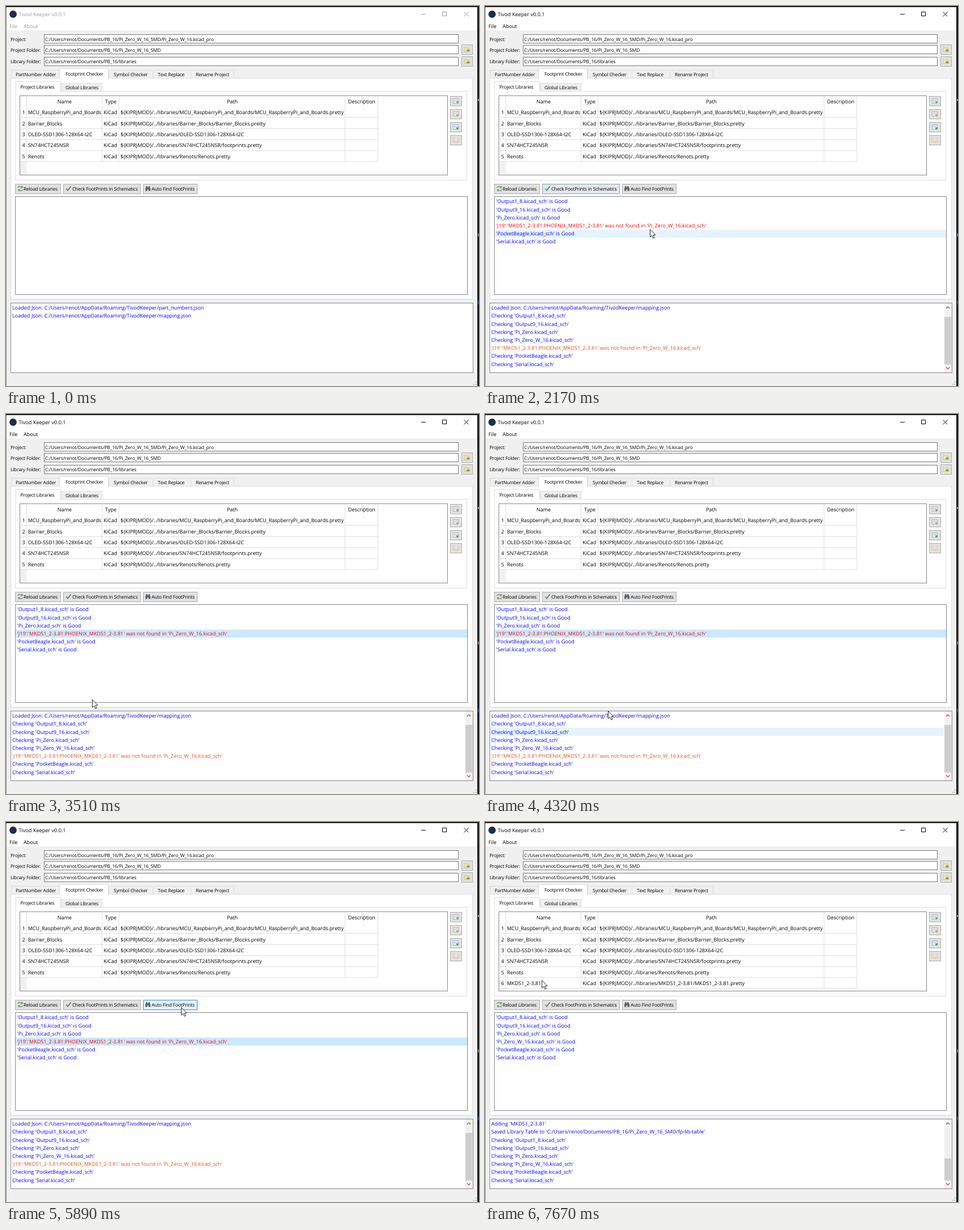
Write an HTML page that moves like this. It is 835x671 px and loops after 8000 ms.

```html
<!DOCTYPE html>
<html lang="en">
<head>
<meta charset="utf-8">
<title>Tivod Keeper</title>
<style>
html, body { margin: 0; width: 100%; height: 100%; overflow: hidden; background: #f0f0f0; }
svg { display: block; width: 835px; height: 671px; }
text {
  font: 9.05px "Open Sans", "Noto Sans", sans-serif;
  font-kerning: none;
  word-spacing: .25px;
  text-rendering: geometricPrecision;
}
.ui { font-size: 8.4px; letter-spacing: -.22px; }
.path { font-size: 8.4px; letter-spacing: -.14px; }
.mid-x { text-anchor: middle; }
.blue { fill: #00f; }
.red { fill: #f00; }
.orange { fill: #e1521f; }

.anim { animation: 8s step-end -10ms infinite; }
.before { animation-name: before; }
.after { animation-name: after; }
.checked { animation-name: checked; }
.fixed { animation-name: fixed; }
.active { animation-name: active; }
.check { animation-name: check; }
.find { animation-name: find; }
.selected { animation-name: selected; }
.list-hover { animation-name: list-hover; }
.log-hover { animation-name: log-hover; }
.cursor { animation-name: cursor; }

@keyframes before { 0% { opacity: 1 } 17%, 100% { opacity: 0 } }
@keyframes after { 0% { opacity: 0 } 17%, 100% { opacity: 1 } }
@keyframes checked { 0% { opacity: 0 } 17% { opacity: 1 } 76.25%, 100% { opacity: 0 } }
@keyframes fixed { 0% { opacity: 0 } 76.25%, 100% { opacity: 1 } }
@keyframes active { 0% { color: #999 } 15.25%, 100% { color: #000 } }

@keyframes check {
  0% { fill: #e1e1e1; stroke: #adadad }
  11.125% { fill: #e5f1fb; stroke: #2c8fdd }
  15.25% { fill: #cce4f7; stroke: #005499 }
  17% { fill: #e5f1fb; stroke: #2c8fdd }
  24.5% { fill: #e5f1fb; stroke: #2c8fdd; animation-timing-function: linear }
  29%, 100% { fill: #e1e1e1; stroke: #adadad }
}
@keyframes find {
  0% { fill: #e1e1e1; stroke: #adadad }
  71.125% { fill: #e5f1fb; stroke: #2c8fdd }
  75.375% { fill: #cce4f7; stroke: #005499 }
  76.25% { fill: #e5f1fb; stroke: #2c8fdd }
  85.5% { fill: #e5f1fb; stroke: #2c8fdd; animation-timing-function: linear }
  90%, 100% { fill: #e1e1e1; stroke: #adadad }
}
@keyframes selected {
  0% { fill: #fff }
  33% { fill: #cce8ff }
  75.375% { fill: #d9d9d9 }
  76.25%, 100% { fill: #fff }
}
@keyframes list-hover {
  0% { opacity: 0 }
  24.5% { opacity: 1; transform: translateY(0) }
  25.375% { transform: translateY(14.2px) }
  26.25% { transform: translateY(28.4px) }
  27.125% { transform: translateY(56.8px) }
  28% { opacity: 1; transform: translateY(42.6px) }
  33%, 100% { opacity: 0 }
}
@keyframes log-hover {
  0% { opacity: 0 }
  44.75% { opacity: 1; transform: translateY(42.6px) }
  45.625% { transform: translateY(71px) }
  47.375% { transform: translateY(56.8px) }
  54% { opacity: 1; transform: translateY(28.4px) }
  54.875%, 100% { opacity: 0 }
}
@keyframes cursor {
  0% { transform: translate(-40px, 0) }
  4.25% { transform: translate(463px, 618px) }
  5.125% { transform: translate(350px, 548px) }
  6% { transform: translate(236px, 478px) }
  8.5% { transform: translate(236px, 478px); animation-timing-function: steps(4, start) }
  12% { transform: translate(140px, 323px) }
  24.5% { transform: translate(140px, 323px); animation-timing-function: steps(4, start) }
  28% { transform: translate(291px, 394px); animation-timing-function: steps(3, start) }
  31% { transform: translate(313px, 388px) }
  36.375% { transform: translate(313px, 388px); animation-timing-function: steps(4, start) }
  39.875% { transform: translate(124px, 388px) }
  43.875% { transform: translate(152px, 504px) }
  44.75% { transform: translate(185px, 580px) }
  45.625% { transform: translate(205px, 603px) }
  46.5% { transform: translate(207px, 597px) }
  47.375% { transform: translate(207px, 591px) }
  54% { transform: translate(217px, 524px); animation-timing-function: steps(4, end) }
  57.5% { transform: translate(378px, 303px) }
  59.25% { transform: translate(378px, 303px); animation-timing-function: steps(5, start) }
  63.25% { transform: translate(346px, 261px) }
  65.875% { transform: translate(346px, 261px); animation-timing-function: steps(7, start) }
  72% { transform: translate(309px, 327px) }
  85.5% { transform: translate(309px, 327px); animation-timing-function: steps(5, start) }
  89.875% { transform: translate(564px, 270px); animation-timing-function: steps(6, start) }
  95.125%, 100% { transform: translate(100px, 279px) }
}
</style>
</head>
<body>
<svg id="stage" viewBox="0 0 835 671"></svg>
<script>
const ROW = 14.2;
const USER = 'C:/Users/renot';
const DATA = USER + '/AppData/Roaming/TivodKeeper';
const PROJECT = USER + '/Documents/PB_16';

const text = (x, y, s, cls = '') => `<text x="${x}" y="${y}" class="${cls}">${s}</text>`;
const fill = (x, y, w, h, color, cls = '') =>
  `<rect x="${x}" y="${y}" width="${w}" height="${h}" fill="${color}" class="${cls}"/>`;
const box = (x, y, w, h, color, line, cls = '') =>
  `<rect x="${x + .5}" y="${y + .5}" width="${w - 1}" height="${h - 1}" fill="${color}" stroke="${line}" class="${cls}"/>`;
const line = (d, color, width = 1) =>
  `<path d="${d}" fill="none" stroke="${color}" stroke-width="${width}"/>`;
const group = (cls, s) => `<g class="anim ${cls}">${s}</g>`;
const button = (x, y, w, h, cls = '') => box(x, y, w, h, '#e1e1e1', '#adadad', cls);

function frame() {
  const ink = 'currentColor';
  return fill(0, 0, 835, 671, '#f0f0f0') + fill(0, 2, 833, 41, '#fff') +
    fill(0, 0, 835, 2, '#1b1b1d') + fill(0, 2, 1, 669, '#8a8a8a') +
    fill(832, 2, 3, 669, '#1b1b1d') + fill(833, 165, 2, 2, '#ddd') +
    fill(833, 402, 2, 5, '#8a7420') + fill(833, 520, 2, 7, '#2c3cae') +
    '<circle cx="12.5" cy="14.5" r="6.5" fill="#1b2f4d"/>' +
    group('active', `<g fill="${ink}">` + text(22.5, 18, 'Tivod Keeper v0.0.1') +
      text(6, 38.5, 'File') + text(31, 38.5, 'About') + '</g>' +
      line('M733 14.5h8M770.5 10.5h7v7h-7zM808.5 10.5l8 8m0-8l-8 8', ink)) +
    fill(829, 663, 2, 2, '#bbb') + fill(829, 667, 2, 2, '#bbb') + fill(825, 667, 2, 2, '#bbb');
}

function folderIcon(x, y) {
  return `<path d="M${x} ${y}h4l1 1.5h4v6h-9z" fill="#f5e3a6" stroke="#c9b57a" stroke-width=".7"/>` +
    `<path d="M${x + 4} ${y + 4.500}h2.500v-1.700l3.500 2.700l-3.500 2.700v-1.700h-2.500z" fill="#6a9c4a"/>`;
}

function sheetIcon(x, y, mark) {
  return box(x, y, 10, 9, '#e6f0f5', '#a3bac6') + line(`M${x + 2} ${y + 3}h6m-6 2h5`, '#b4c8d4') +
    `<circle cx="${x + 8}" cy="${y + 7}" r="2" fill="${mark}"/>`;
}

function fields() {
  const items = [
    ['Project:', '/Pi_Zero_W_16_SMD/Pi_Zero_W_16.kicad_pro', 50, 61.5],
    ['Project Folder:', '/Pi_Zero_W_16_SMD', 69, 80.5],
    ['Library Folder:', '/libraries', 90, 101],
  ];
  return items.map(([label, path, top, base], i) =>
    text(8, base, label, 'ui') + box(67, top, 732, 16, '#fff', '#7a7a7a') +
    text(69, base, PROJECT + path, 'path') +
    (i ? button(804, top - 1, 20, 18) + folderIcon(809, top + 4) : '')).join('');
}

function tabs() {
  const edge = '#dcdcdc';
  const tab = (x, y, w, h, tx, base, s, on) =>
    box(x, y, w, h, on ? '#fff' : '#f0f0f0', edge) +
    (on ? fill(x + 1, y + h - 1, w - 2, 2, '#fff') : '') + text(tx, base, s, 'ui');
  return box(8, 127, 816, 391, '#fff', edge) +
    tab(9, 113, 86, 15, 17, 123.5, 'PartNumber Adder') +
    tab(181, 113, 79, 15, 190, 123.5, 'Symbol Checker') +
    tab(259, 113, 68, 15, 268, 123.5, 'Text Replace') +
    tab(326, 113, 77, 15, 335, 123.5, 'Rename Project') +
    tab(94, 110, 87, 18, 105, 123, 'Footprint Checker', true) +
    box(16, 150, 798, 158, '#fff', edge) +
    tab(97, 136, 73, 15, 105, 146.5, 'Global Libraries') +
    tab(16, 133, 81, 18, 25.5, 146, 'Project Libraries', true);
}

function table() {
  const grid = '#dedede', step = 19.4;
  const rows = [
    ['MCU_RaspberryPi_and_Boards', 'MCU_RaspberryPi_and_Boards/MCU_RaspberryPi_and_Boards.pretty'],
    ['Barrier_Blocks', 'Barrier_Blocks/Barrier_Blocks.pretty'],
    ['OLED-SSD1306-128X64-I2C', 'OLED-SSD1306-128X64-I2C'],
    ['SN74HCT245NSR', 'SN74HCT245NSR/footprints.pretty'],
    ['Renots', 'Renots/Renots.pretty'],
    ['MKDS1_2-3.81', 'MKDS1_2-3.81/MKDS1_2-3.81.pretty'],
  ];
  const row = ([name, path], i) => {
    const top = Math.round(178 + i * step), base = 191.2 + i * step;
    const s = fill(26, top, 11, 19, '#fff') +
      line([37, 170, 200, 599, 657].map(x => `M${x - .5} ${top}v20`).join('') +
        `M26 ${Math.round(178 + (i + 1) * step) - .5}h631`, grid) +
      text(31, base, i + 1, 'mid-x') + text(38.7, base, name) + text(172.2, base, 'KiCad') +
      text(202, base, '\${KIPRJMOD}/../libraries/' + path);
    return i === 5 ? group('fixed', s) : s;
  };
  const heads = [['Name', 103.5], ['Type', 185], ['Path', 399.5], ['Description', 628]];
  const marks = ['#6fae62', '#ee9440', '#5f9c55'];
  return box(24, 158, 756, 141, '#fff', '#828790') + fill(25, 275, 12, 23, '#f0f0f0') +
    line([37, 170, 200, 599, 657].map(x => `M${x - .5} 159v19`).join(''), grid) +
    heads.map(([s, x]) => text(x, 172.2, s, 'mid-x')).join('') + rows.map(row).join('') +
    [159, 182, 205, 228].map((y, i) => button(784, y, 21, 18) + (i < 3
      ? sheetIcon(789, y + 4, marks[i])
      : `<path d="M789.5 ${y + 4.5}h9v8h-9z" fill="#f3e0b8" stroke="#d6bc8a" stroke-width=".8"/>` +
        fill(792, y + 4, 6, 4, '#d5e4ee'))).join('');
}

function buttons() {
  return button(16, 314, 81, 18) + button(101, 314, 137, 18, 'anim check') + button(242, 314, 96, 18, 'anim find') +
    line('M21 321q3-4 6-1h2m-2-2.500l2.500 2.500l-2.500 2M30 324q-3 4-6 1h-2m2-2l-2.500 2l2.500 2', '#6f9f68', 1.4) +
    line('M106.500 322.500l2.500 3l5.500-7', '#4d9450', 1.9) +
    '<path d="M247.500 318h2v2h2v-2h2l1.500 5v3.500h-3.500v-3h-2v3h-3.500v-3.500z" fill="#5a616a"/>' +
    text(31, 325.7, 'Reload Libraries', 'ui') +
    text(117, 325.7, 'Check FootPrints in Schematics', 'ui') +
    text(257, 325.7, 'Auto Find FootPrints', 'ui');
}

const sheets = ['Output1_8', 'Output9_16', 'Pi_Zero', 'Pi_Zero_W_16', 'PocketBeagle', 'Serial'];
const missing = "'J19':'MKDS1_2-3.81:PHOENIX_MKDS1_2-3.81' was not found in 'Pi_Zero_W_16.kicad_sch'";

function results() {
  const base = i => 348.3 + i * ROW;
  return box(16, 336, 799, 174, '#fff', '#828790') +
    fill(17, 338 + 3 * ROW, 797, ROW, '#fff', 'anim selected') +
    fill(17, 338, 797, ROW, '#e5f3ff', 'anim list-hover') +
    sheets.map((name, i) => group(i === 3 ? 'fixed' : 'after',
      text(19.8, base(i), `'${name}.kicad_sch' is Good`, 'blue'))).join('') +
    group('checked', text(19.8, base(3), missing, 'red'));
}

function log() {
  const lines = list => list.map((s, i) =>
    text(11, 536.2 + i * ROW, s, s === missing ? 'orange' : 'blue')).join('');
  const thumb = (y, h) => fill(811, y, 12, h, '#cdcdcd');
  const loaded = name => `Loaded Json: ${DATA}/${name}.json`;
  const checks = sheets.map(name => `Checking '${name}.kicad_sch'`);
  return box(8, 524, 817, 124, '#fff', '#828790') +
    fill(9, 526, 801, ROW, '#e5f3ff', 'anim log-hover') +
    group('before', lines([loaded('part_numbers'), loaded('mapping')])) +
    group('after', fill(811, 525, 13, 122, '#f0f0f0') +
      line('M814 534l3-3l3 3M814 638l3 3l3-3', '#c0442e', 1.2)) +
    group('checked', thumb(549, 84) +
      lines([loaded('mapping'), ...checks.slice(0, 4), missing, ...checks.slice(4)])) +
    group('fixed', thumb(594, 39) + lines(["Adding 'MKDS1_2-3.81'",
      `Saved Library Table to '${PROJECT}/Pi_Zero_W_16_SMD/fp-lib-table'`, ...checks]));
}

const cursor = group('cursor',
  '<path d="M.5 .5v13.500l3.200-2.900l2.100 5l2.200-1l-2.100-4.800h4.100z" fill="#fff" stroke="#111" stroke-width=".9"/>');

document.getElementById('stage').innerHTML =
  [frame(), fields(), tabs(), table(), buttons(), results(), log(), cursor].join('');
</script>
</body>
</html>
```
